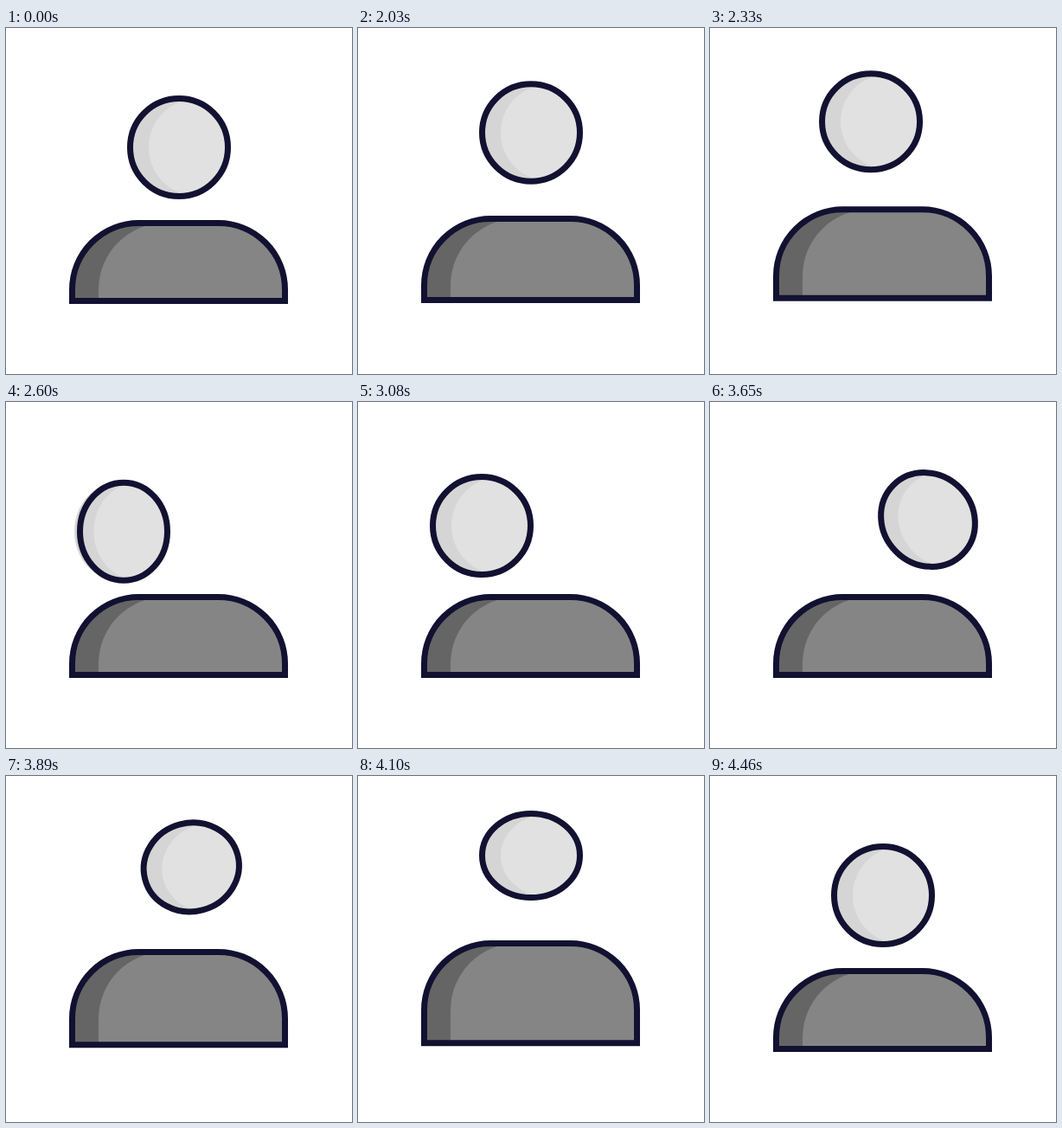
These frames come from a looping animation (400x400 px, 4550 ms). An HTML page with a canvas:

```html
<!DOCTYPE html>
<html lang="en">
<head>
<meta charset="utf-8">
<title>Avatar looking around</title>
<style>
  html, body { margin: 0; width: 100%; height: 100%; overflow: hidden; background: #fff; }
  canvas { display: block; width: 400px; height: 400px; }
</style>
</head>
<body>
<canvas id="stage" width="400" height="400"></canvas>
<script>
const ctx = document.getElementById('stage').getContext('2d');
const LOOP = 4550, STEP = 30, START = 2030;
const INK = '#121131', STROKE = 7, R = 56.5;
const HEAD_LIGHT = '#e1e1e1', HEAD_SHADE = '#d5d5d5';
const BODY_LIGHT = '#858585', BODY_SHADE = '#656565';

// Each track is a few [time, value] points joined by a smooth curve
const headX = track([2180, 200], [2390, 178], [2540, 157], [2600, 136], [2720, 133],
  [2900, 133], [3080, 143], [3200, 200], [3350, 253], [3650, 252], [3950, 206], [4040, 200]);
const headY = track([2000, 138], [2030, 121], [2180, 91], [2270, 95], [2390, 125], [2540, 149.5],
  [2900, 150], [3080, 143], [3200, 160], [3350, 138], [3650, 136], [4040, 91], [4100, 92],
  [4220, 115], [4460, 138]);
const headRx = track([2390, R], [2600, 50.5], [2900, 50.5], [3080, R], [3200, R],
  [3350, 50.5], [3650, 52.2], [4040, R]);
const headRy = track([2000, R], [2180, 51.5], [2390, R], [3650, R], [4040, 48.5],
  [4100, 48.5], [4460, R]);
const headTilt = track([3200, 0], [3350, -20], [3530, -20], [3650, -45], [4040, 0]);
const bodyLift = track([2000, 0], [2030, 5], [2180, 32], [2270, 27], [2420, 0], [3650, 0],
  [4040, 33], [4100, 32], [4220, 14], [4460, 0]);
const shadeLead = track([2480, 0], [2600, -6.5], [2720, 0]);

function track(...keys) {
  const end = keys.length - 1;
  const slope = i => (keys[i + 1][1] - keys[i][1]) / (keys[i + 1][0] - keys[i][0]);
  // Flat at turning points, harmonic mean elsewhere, so values never overshoot
  const tangent = i => {
    if (i === 0 || i === end) return 0;
    const a = slope(i - 1), b = slope(i);
    return a * b <= 0 ? 0 : 2 * a * b / (a + b);
  };
  return t => {
    if (t <= keys[0][0]) return keys[0][1];
    if (t >= keys[end][0]) return keys[end][1];
    const i = keys.findIndex(key => key[0] > t) - 1;
    const [t0, from] = keys[i], [t1, to] = keys[i + 1];
    const span = t1 - t0, u = (t - t0) / span, v = 1 - u;
    return from * (1 + 2 * u) * v * v + to * u * u * (3 - 2 * u)
      + span * u * v * (tangent(i) * v - tangent(i + 1) * u);
  };
}

function fill(path, color) {
  ctx.fillStyle = color;
  ctx.fill(path);
}

function outline(path) {
  ctx.strokeStyle = INK;
  ctx.lineWidth = STROKE;
  ctx.stroke(path);
}

function fillInside(shape, path, color) {
  ctx.save();
  ctx.clip(shape);
  fill(path, color);
  ctx.restore();
}

function bodyPath(left, lift) {
  const right = 322.5, top = 225.5 - lift, bottom = 315.5 - lift * 0.21, r = 77;
  const path = new Path2D();
  path.moveTo(left, bottom);
  path.lineTo(left, top + r);
  path.arc(left + r, top + r, r, Math.PI, Math.PI * 1.5);
  path.arc(right - r, top + r, r, Math.PI * 1.5, Math.PI * 2);
  path.lineTo(right, bottom);
  path.closePath();
  return path;
}

function drawBody(t) {
  const lift = bodyLift(t), body = bodyPath(76.5, lift);
  fill(body, BODY_SHADE);
  fillInside(body, bodyPath(107, lift), BODY_LIGHT);
  outline(body);
}

function drawHead(t) {
  const rx = headRx(t), lead = shadeLead(t);
  const ellipse = shift => {
    const path = new Path2D();
    path.ellipse(headX(t) + shift, headY(t), rx, headRy(t), headTilt(t) * Math.PI / 180, 0, Math.PI * 2);
    return path;
  };
  const head = ellipse(0);
  fill(ellipse(lead), HEAD_SHADE);
  fill(head, HEAD_SHADE);
  fillInside(head, ellipse(rx * 0.38 + lead / 2), HEAD_LIGHT);
  outline(head);
}

const origin = performance.now();
function tick() {
  const elapsed = (performance.now() - origin) % LOOP;
  const t = START + Math.floor((elapsed - START) / STEP) * STEP;
  ctx.clearRect(0, 0, 400, 400);
  drawBody(t);
  drawHead(t);
  requestAnimationFrame(tick);
}
tick();
</script>
</body>
</html>
```
